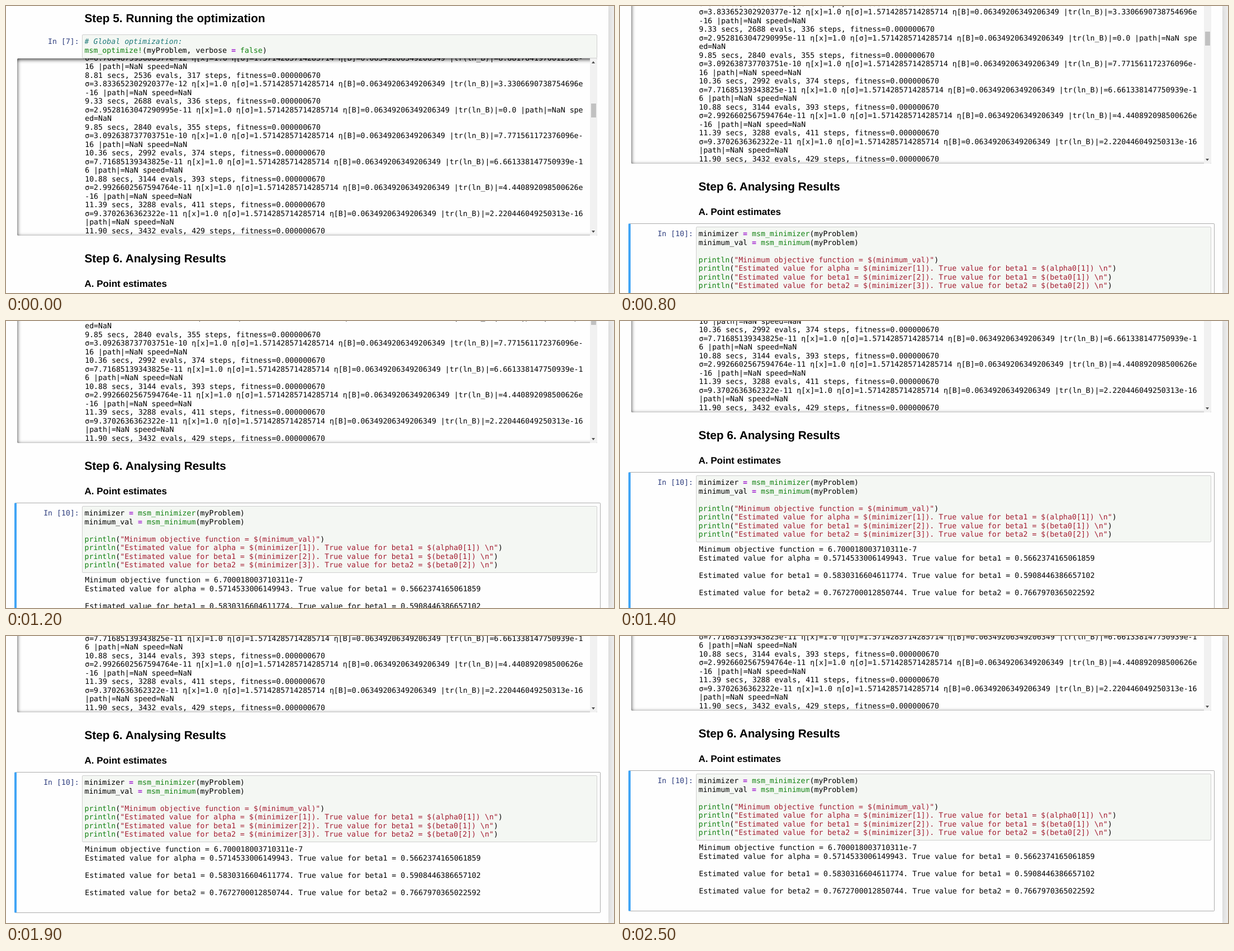
Animation of 1088x515 px, one loop 3200 ms. Source, as an HTML page:

```html
<!DOCTYPE html>
<html lang="en">
<head>
<meta charset="utf-8">
<title>Notebook scroll</title>
<style>
  html, body { margin: 0; width: 100%; height: 100%; overflow: hidden; background: #eee; }
  #sheet {
    position: absolute; left: 0; top: 0; width: 1078px; height: 515px; overflow: hidden;
    background: #fefefe; box-shadow: 0 0 11px 1px rgba(87, 87, 87, .2);
  }
  #page { position: absolute; left: 0; top: 0; width: 1078px; height: 800px; }
  #page * { box-sizing: border-box; margin: 0; }
  #page > *, #log > * { position: absolute; }
  pre {
    font: 13.23px/15.48px "DejaVu Sans Mono", monospace;
    color: #000; white-space: pre; text-rendering: geometricPrecision;
  }
  h2, h3 {
    left: 140.5px; white-space: nowrap; color: #000; text-rendering: geometricPrecision;
    font: bold 20.79px/24px "Liberation Sans", Arial, sans-serif;
  }
  h3 { font-size: 17px; line-height: 20px; }
  .prompt { left: 20px; width: 110.8px; text-align: right; color: #303f7f; }
  .input {
    left: 136px; width: 922px; border: 1px solid #cfcfcf; border-radius: 2px; background: #f4f7f3;
  }
  .code { left: 140.5px; }
  .out { left: 141.2px; }
  .comment { color: #217a7a; font-style: italic; }
  .string { color: #a31c30; }
  .name { color: #128212; }
  .op { color: #a01fd0; font-weight: bold; }
  #cell {
    left: 14.5px; top: 519px; width: 1049.5px; height: 253px;
    border: 1px solid #ababab; border-left: 4.7px solid #42a5f5; border-radius: 2px;
  }
  #log {
    left: 20px; top: 94px; width: 1038px; height: 317.5px; overflow: hidden; border-radius: 2px;
    box-shadow: inset 0 1.9px 7.6px rgba(0, 0, 0, .8);
  }
  #log pre { left: 121.2px; top: -7.2px; }
  #bar { right: 0; top: 0; width: 13px; height: 100%; background: #f1f1f1; }
  #bar * { position: absolute; }
  #thumb { left: 2px; top: 81px; width: 9px; height: 25px; background: #c1c1c1; }
  .arrow { left: 3px; border: solid transparent; border-width: 0 3.5px; }
  .up { top: 5px; border-bottom: 4px solid #505050; }
  .down { bottom: 5px; border-top: 4px solid #505050; }
</style>
</head>
<body>
<div id="sheet"><div id="page">
  <h2 style="top:11px">Step 5. Running the optimization</h2>
  <pre class="prompt" style="top:57.3px">In [7]:</pre>
  <div class="input" style="top:51px;height:43px"></div>
  <pre class="code" style="top:57.3px"># Global optimization:
msm_optimize!(myProblem, verbose = false)</pre>

  <div id="log">
    <pre></pre>
    <div id="bar"><i class="arrow up"></i><i id="thumb"></i><i class="arrow down"></i></div>
  </div>

  <h2 style="top:442px">Step 6. Analysing Results</h2>
  <h3 style="top:489px">A. Point estimates</h3>

  <div id="cell"></div>
  <pre class="prompt" style="top:531.3px">In [10]:</pre>
  <div class="input" style="top:525px;height:120px"></div>
  <pre class="code" style="top:531.3px">minimizer = msm_minimizer(myProblem)
minimum_val = msm_minimum(myProblem)

println("Minimum objective function = $(minimum_val)")
println("Estimated value for alpha = $(minimizer[1]). True value for beta1 = $(alpha0[1]) \n")
println("Estimated value for beta1 = $(minimizer[2]). True value for beta1 = $(beta0[1]) \n")
println("Estimated value for beta2 = $(minimizer[3]). True value for beta2 = $(beta0[2]) \n")</pre>
  <pre class="out" style="top:651.3px">Minimum objective function = 6.700018003710311e-7
Estimated value for alpha = 0.5714533006149943. True value for beta1 = 0.5662374165061859

Estimated value for beta1 = 0.5830316604611774. True value for beta1 = 0.5908446386657102

Estimated value for beta2 = 0.7672700012850744. True value for beta2 = 0.7667970365022592</pre>
</div></div>

<script>
const LOOP = 3200, COLUMNS = 112;

// Optimizer log: step summary, sigma, trace
const entries = [
  ['8.29 secs, 2384 evals, 298 steps', '6.760487595600577e-12', '8.881784197001252e-16'],
  ['8.81 secs, 2536 evals, 317 steps', '3.833652302920377e-12', '3.3306690738754696e-16'],
  ['9.33 secs, 2688 evals, 336 steps', '2.9528163047290995e-11', '0.0'],
  ['9.85 secs, 2840 evals, 355 steps', '3.092638737703751e-10', '7.771561172376096e-16'],
  ['10.36 secs, 2992 evals, 374 steps', '7.71685139343825e-11', '6.661338147750939e-16'],
  ['10.88 secs, 3144 evals, 393 steps', '2.9926602567594764e-11', '4.440892098500626e-16'],
  ['11.39 secs, 3288 evals, 411 steps', '9.3702636362322e-11', '2.220446049250313e-16'],
  ['11.90 secs, 3432 evals, 429 steps', '', ''],
];
const wrap = line => line.match(new RegExp(`.{1,${COLUMNS}} ?`, 'g'));
const lines = entries.flatMap(([summary, sigma, trace]) => [
  `${summary}, fitness=0.000000670`,
  ...(sigma ? wrap(`σ=${sigma} η[x]=1.0 η[σ]=1.5714285714285714 η[B]=0.06349206349206349 ` +
    `|tr(ln_B)|=${trace} |path|=NaN speed=NaN`) : []),
]);
document.querySelector('#log pre').textContent = lines.slice(1).join('\n');

// Syntax colours
const token = /(?<comment>#.*)|(?<string>".*?")|(?<name>\w+!?(?=\()|false)|(?<op>=)/g;
for (const block of document.querySelectorAll('.code')) {
  block.innerHTML = block.textContent.replace(token, (text, ...rest) => {
    const groups = rest.at(-1);
    const kind = Object.keys(groups).find(key => groups[key]);
    return `<span class="${kind}">${text}</span>`;
  });
}

// Scroll position, held from each time (ms) until the next
const scroll = [
  [0, 0], [600, 44], [700, 92], [800, 129], [1000, 161], [1200, 193], [1300, 225],
  [1400, 248], [1700, 257], [1800, 268], [1900, 275], [2300, 276], [2400, 277], [2500, 278],
];
const page = document.getElementById('page');
function draw() {
  const time = performance.now() % LOOP;
  const [, offset] = scroll.findLast(([start]) => start <= time);
  page.style.top = `${-offset}px`;
  requestAnimationFrame(draw);
}
draw();
</script>
</body>
</html>
```
